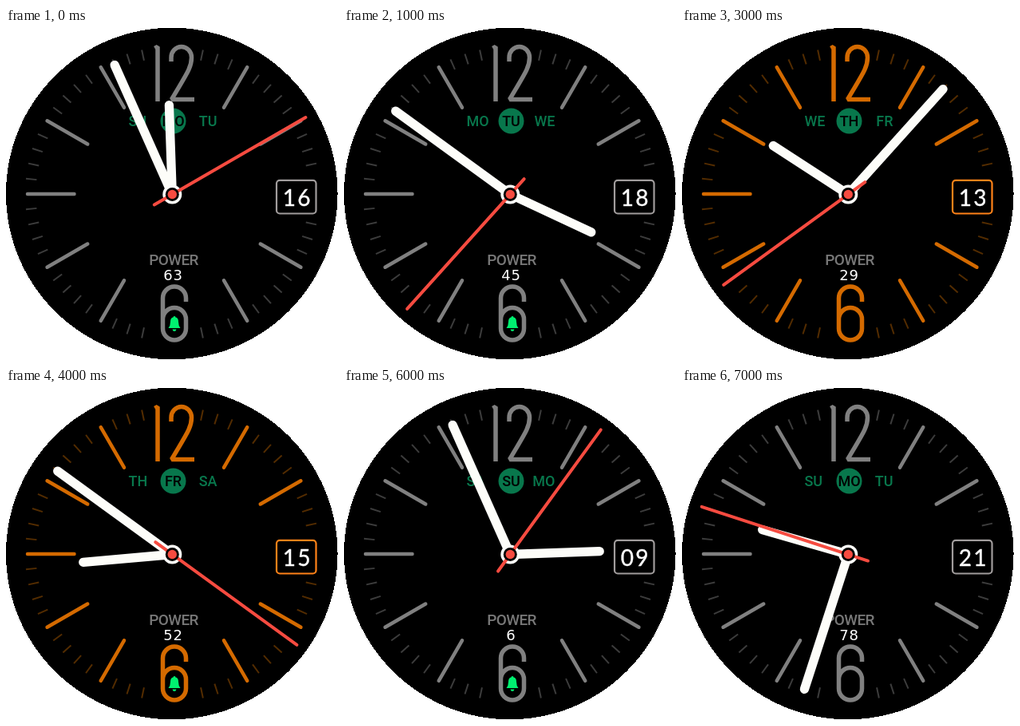
Recreate the animation shown at these times as an HTML page. Size 416 by 416 pixels, loop 8000 ms.

```html
<!DOCTYPE html>
<html lang="en">
<head>
<meta charset="utf-8">
<title>Watch face</title>
<style>
html, body { margin: 0; width: 100%; height: 100%; overflow: hidden; background: #fff; }
svg { display: block; width: 100vw; height: 100vh; }
#face { --mark: #808080; --minor: #3c3c3c; --frame: #a09c9c; }
#face.warm { --mark: #d46a00; --minor: #532c00; --frame: #ff8218; }
.mark { fill: none; stroke: var(--mark); stroke-width: 5.5; stroke-linejoin: bevel; }
.hour { stroke-width: 4.5; stroke-linecap: round; }
.minor { stroke: var(--minor); stroke-width: 2; }
.frame { fill: #000; stroke: var(--frame); stroke-width: 2.2; }
.day { font: 500 18px Roboto, sans-serif; fill: #08774c; }
.power { font: 500 19px Roboto, sans-serif; letter-spacing: -.6px; fill: #777; }
.level { font: 18px "DejaVu Sans", sans-serif; letter-spacing: .8px; fill: #fff; }
.date { font: 28px Lato, sans-serif; letter-spacing: 2.2px; fill: #fff; stroke: #fff; stroke-width: .4; }
.mid { text-anchor: middle; }
.hand { stroke: #fdfdf9; stroke-width: 11.3; stroke-linecap: round; }
.second { stroke: #f64b40; stroke-width: 4; stroke-linecap: round; }
</style>
</head>
<body>
<svg id="face" viewBox="0 0 416 416">
  <circle cx="207.750" cy="207.500" r="207.800" shape-rendering="crispEdges"/>
  <g id="ticks"></g>
  <path class="mark" d="M186.500 25.500L190 23.500V92M207 42V37A12.750 13.500 0 0 1 232.500 37C232.500 50 226 58 207.500 89.500H236"/>
  <path class="mark" d="M225.500 343V338.500A14.500 14.500 0 0 0 196.500 338.500V376.500A14.500 14.500 0 0 0 225.500 376.500V365A14.500 14.500 0 0 0 196.500 365"/>
  <path id="bell" fill="#00f070" d="M203.500 376Q206 373 206 368Q206 363 209.500 362.500Q209.500 361 211 361T212.500 362.500Q216 363 216 368Q216 373 218.500 376ZM208.500 377.500H213.500Q213 380 211 380T208.500 377.500"/>
  <rect class="frame" x="339" y="190.800" width="49.500" height="41.700" rx="4"/>
  <text id="date" class="date mid" x="365.200" y="222.500"></text>
  <text id="prev" class="day" x="153.500" y="123"></text>
  <circle cx="209.500" cy="116.500" r="16" fill="#08774c"/>
  <text id="today" class="day mid" x="209.500" y="123" style="fill:#000"></text>
  <text id="next" class="day" x="264.500" y="123" text-anchor="end"></text>
  <text class="power mid" x="210" y="297">POWER</text>
  <text id="level" class="level mid" x="209.400" y="316"></text>
  <g transform="translate(208.300 208.500)">
    <line id="hour" class="hand" y2="-112"/>
    <line id="minute" class="hand" y2="-177.500"/>
    <circle r="12" fill="#fdfdf9"/>
    <line id="second" class="second" y1="26" y2="-193"/>
    <circle r="8.500"/>
    <circle r="5.700" fill="#f64b40"/>
  </g>
</svg>
<script>
const $ = id => document.getElementById(id);
const days = ['SU', 'MO', 'TU', 'WE', 'TH', 'FR', 'SA'];

// hour, minute, second, weekday, date, power, bell, warm
const scenes = [
  [11, 56, 10, 1, '16', 63, 1, 0],
  [3, 51, 37, 2, '18', 45, 1, 0],
  [4, 42, 45, 3, '22', 2, 0, 0],
  [10, 7, 39, 4, '13', 29, 0, 1],
  [8, 51, 21, 5, '15', 52, 1, 1],
  [12, 2, 23, 6, '17', 30, 1, 1],
  [2, 56, 6, 0, '09', 6, 1, 0],
  [9, 33, 48, 1, '21', 78, 0, 0]
];

function tick(cls, minute, cx, inner, outer) {
  const line = document.createElementNS('http://www.w3.org/2000/svg', 'line');
  line.setAttribute('class', cls);
  line.setAttribute('y1', -inner);
  line.setAttribute('y2', -outer);
  line.setAttribute('transform', `translate(${cx} 208) rotate(${minute * 6})`);
  $('ticks').append(line);
}

for (let m = 2; m < 59; m++) {
  if (Math.abs(m - 15) < 2 || Math.abs(m - 30) < 2) continue;
  if (m % 5) tick('minor', m, 208.5, 171, 184.5);
  else tick('mark hour', m, 210.5, 125, 183.5);
}

const turn = (id, angle) => $(id).setAttribute('transform', `rotate(${angle})`);

function show([h, m, s, day, date, level, bell, warm]) {
  turn('hour', h * 30 + Math.floor(m / 2));
  turn('minute', m * 6);
  turn('second', s * 6);
  $('prev').textContent = days[(day + 6) % 7];
  $('today').textContent = days[day];
  $('next').textContent = days[(day + 1) % 7];
  $('date').textContent = date;
  $('level').textContent = level;
  $('bell').style.display = bell ? '' : 'none';
  $('face').classList.toggle('warm', !!warm);
}

let current = -1;
const start = performance.now();
function draw(now) {
  const i = Math.floor(Math.max(0, now - start) / 1000) % scenes.length;
  if (i !== current) show(scenes[current = i]);
  requestAnimationFrame(draw);
}
draw(start);
</script>
</body>
</html>
```
